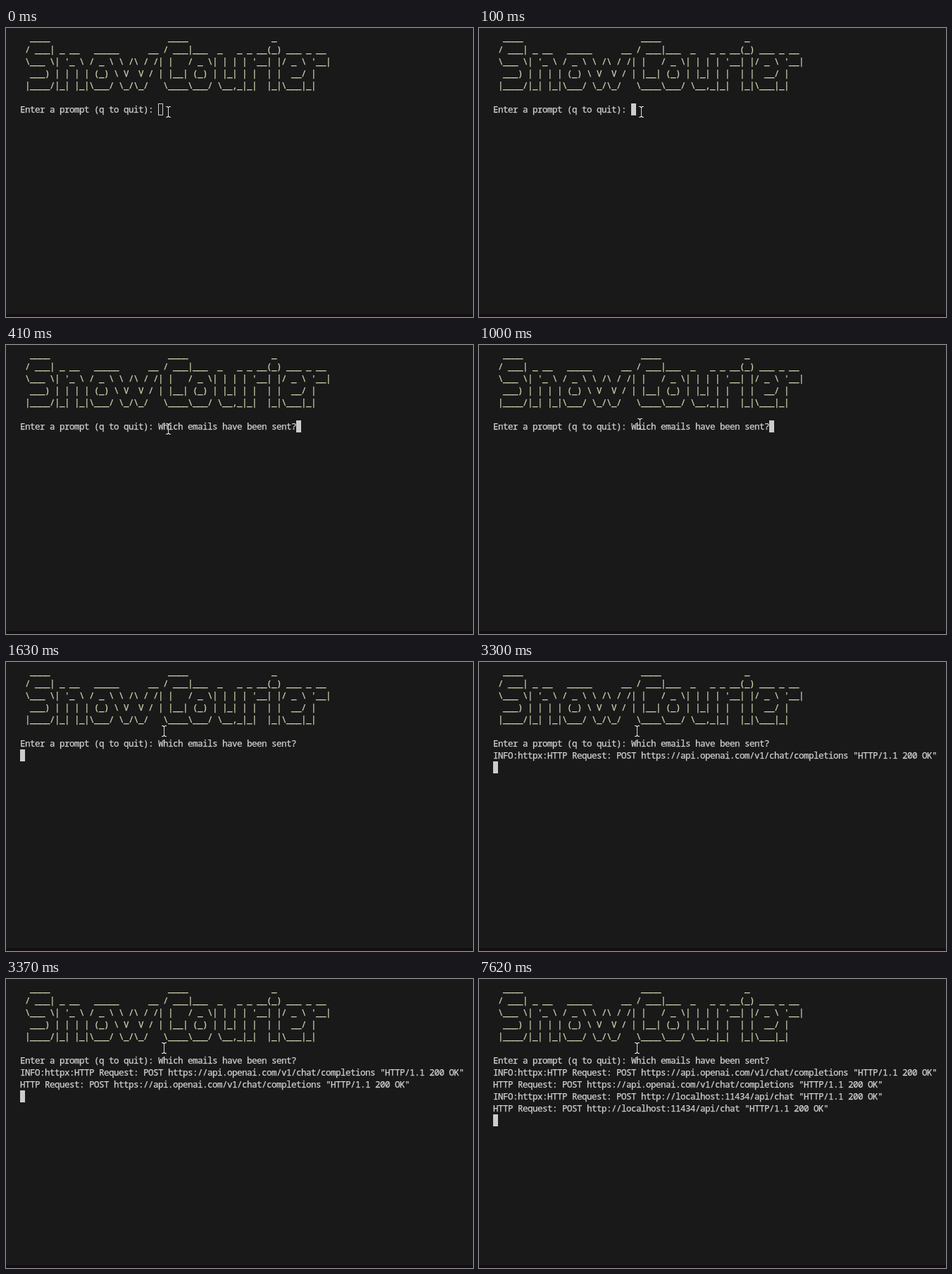
An HTML page that plays this animation: 663 px wide and 410 px high, repeating every 8000 ms.

```html
<!DOCTYPE html>
<html lang="en">
<head>
<meta charset="utf-8">
<title>Terminal prompt</title>
<style>
  html, body { margin: 0; width: 100%; height: 100%; overflow: hidden; background: #191919; }
  #stage { position: relative; width: 663px; height: 410px; overflow: hidden; background: #191919; }
  pre {
    position: absolute; left: 20px; margin: 0; color: #d2d2d2;
    font: 12.5px/17px "Noto Sans Mono", "DejaVu Sans Mono", monospace;
    letter-spacing: -0.5px;
    font-variant-ligatures: none;
    -webkit-text-stroke: 0.25px currentColor;
  }
  #banner { top: 5px; color: #d4d3b0; }
  #log { top: 107px; }
  #cursor { position: absolute; box-sizing: border-box; width: 7px; height: 17px; border: 1px solid #cccccc; }
  #beam { position: absolute; left: 0; top: 0; }
  #edge { position: absolute; left: 0; right: 0; bottom: 0; height: 4px; background: #140d11; }
</style>
</head>
<body>
<div id="stage">
  <pre id="banner"></pre>
  <pre id="log"></pre>
  <div id="cursor"></div>
  <svg id="beam" width="7" height="16" shape-rendering="crispEdges">
    <path d="M0 0h3v1h1v-1h3v1h-2v1h-1v12h1v1h2v1h-3v-1h-1v1h-3v-1h2v-1h1v-12h-1v-1h-2z" fill="#d8d8d8"/>
  </svg>
  <div id="edge"></div>
</div>
<script>
const LOOP = 8000, CELL = 7, ROW = 17, LEFT = 20, TOP = 107;
const $ = id => document.getElementById(id);

const first = [
  String.raw` ____`,
  String.raw`/ ___| _ __   _____      __`,
  String.raw`\___ \| '_ \ / _ \ \ /\ / /`,
  String.raw` ___) | | | | (_) \ V  V /`,
  String.raw`|____/|_| |_|\___/ \_/\_/`
];
const second = [
  String.raw`  ____                 _`,
  String.raw` / ___|___  _   _ _ __(_) ___ _ __`,
  String.raw`| |   / _ \| | | | '__| |/ _ \ '__|`,
  String.raw`| |__| (_) | |_| | |  | |  __/ |`,
  String.raw` \____\___/ \__,_|_|  |_|\___|_|`
];
$("banner").textContent = first.map((s, i) => " " + s.padEnd(27) + second[i]).join("\n");

const prompt = "Enter a prompt (q to quit): ";
const asked = prompt + "Which emails have been sent?";
const request = url => `HTTP Request: POST ${url} "HTTP/1.1 200 OK"\n`;
const info = "INFO:httpx:";
const chat = request("https://api.openai.com/v1/chat/completions");
const local = request("http://localhost:11434/api/chat");

// [start ms, terminal text]; the cursor sits after the last character
const output = [
  [0, prompt],
  [410, asked],
  [1630, asked + "\n"],
  [3300, asked + "\n" + info + chat],
  [3370, asked + "\n" + info + chat + chat],
  [7620, asked + "\n" + info + chat + chat + info + local + local]
];
// [start ms, x, y] of the mouse pointer
const pointer = [
  [0, 227, 111],
  [1000, 225, 104],
  [1070, 223, 97],
  [1140, 221, 90]
];
const at = (steps, t) => steps.filter(s => s[0] <= t).pop();

let shown = null;
function draw() {
  const t = performance.now() % LOOP;
  const text = at(output, t)[1];
  if (text !== shown) {
    $("log").textContent = shown = text;
    const lines = text.split("\n");
    const row = lines.length - 1;
    $("cursor").style.left = LEFT + lines[row].length * CELL + "px";
    $("cursor").style.top = TOP + row * ROW + "px";
  }
  $("cursor").style.background = t < 100 ? "none" : "#cccccc";
  const [, x, y] = at(pointer, t);
  $("beam").style.transform = `translate(${x}px, ${y}px)`;
  requestAnimationFrame(draw);
}
draw();
</script>
</body>
</html>
```
